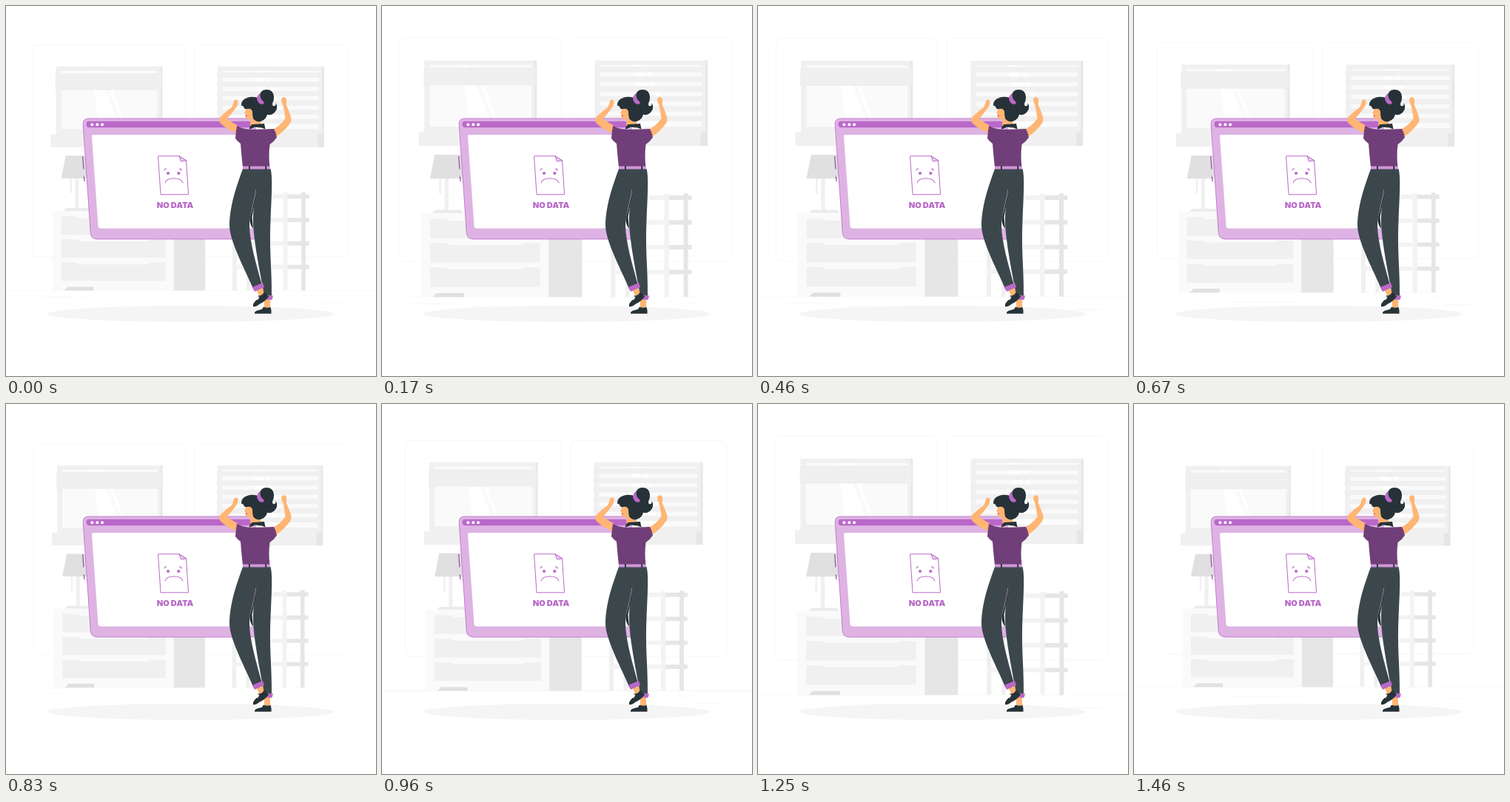
Write an HTML page that moves like this. It is 500x500 px and loops after 1.5 s.

```html
<!DOCTYPE html>
<html lang="en">
<head>
<meta charset="utf-8">
<title>No data</title>
<style>
  html, body { margin: 0; width: 100%; height: 100%; overflow: hidden; background: #fff; }
  svg { display: block; width: 100%; height: 100%; }
  text { font: 900 11px Inter, sans-serif; fill: #ba68c8; text-anchor: middle; }
</style>
</head>
<body>
<svg viewBox="0 0 500 500">
  <g id="room">
    <g fill="none" stroke="#f0f0f0" stroke-width=".5">
      <rect x="38.3" y="55.1" width="204.3" height="282.6" rx="5.6"/>
      <rect x="254.6" y="55.1" width="204.3" height="282.6" rx="5.6"/>
    </g>
    <path fill="#ebebeb" d="M0 382.4h500v.3H0zM416.8 398.5h33.1v.3h-33.1zM322.5 401.2h8.7v.3h-8.7zM396.6 389.2h19.2v.3h-19.2zM52.5 390.9h43.2v.3H52.5zM104.6 390.9h6.3v.3h-6.3zM131.5 395.1h93.7v.3h-93.7z"/>

    <g id="leftWindow">
      <path fill="#f0f0f0" d="M70 83.7h140v91H70zM63 174h153v17.5H63z"/>
      <path fill="#e6e6e6" d="M209.3 83.7h2.5v91h-2.5z"/>
      <path fill="#fafafa" d="M76.8 89.5h128.5v77.7H76.8z"/>
      <path fill="#fff" d="M117 89.5h9l30 77.7h-28zM131 89.5h4l30 77.7h-4z"/>
      <path fill="#f0f0f0" d="M69.2 92.5h141.3v22.8H69.2z"/>
    </g>
    <g id="rightWindow">
      <path fill="#f0f0f0" d="M285.5 83.7h140v91h-140zM273 174h147v17.5H273z"/>
      <path fill="#e6e6e6" d="M425 83.7h2.5v91H425zM419 174h8.5v17.5H419z"/>
      <path fill="#fafafa" d="M292 89.5h128.5v77.7H292z"/>
      <path fill="#fff" d="M333 89.5h9l30 77.7h-28zM347 89.5h4l30 77.7h-4z"/>
    </g>

    <g id="lamp">
      <path fill="#f0f0f0" d="M88.7 232h2.3v20.5h-2.3zM95.5 232h5v41h-5z"/>
      <path fill="#e0e0e0" d="M83 202.7h34l7 30.3H77z"/>
      <path fill="#ebebeb" d="M80.5 276.5q1-4 5-4h28q4 0 5 4z"/>
    </g>
    <g id="dresser">
      <path fill="#fafafa" d="M65.5 276.3h162v106.1h-162z"/>
      <path fill="#e6e6e6" d="M227 276.3h42v106.1h-42z"/>
      <path fill="#e0e0e0" d="M80.5 382.4l5-5h34.5v5z"/>
    </g>
    <g id="rack">
      <path fill="#f0f0f0" d="M305.3 252h5.7v130.4h-5.7zM324 252h5v130.4h-5z"/>
      <path id="backRungs" fill="#f3f3f3"/>
      <path id="frontRungs" fill="#e6e6e6"/>
      <path fill="#f3f3f3" d="M372.8 252h6v130.4h-6z"/>
      <path fill="#e6e6e6" d="M397.2 251.4h5.6v131h-5.6z"/>
    </g>
  </g>

  <ellipse cx="249.5" cy="416" rx="193.5" ry="11" fill="#f5f5f5"/>

  <g id="monitor">
    <path fill="#deb3e4" stroke="#ba68c8" stroke-width=".8" d="M112 152H328q8 0 8.500 8L346 307q0 8-8 8H124q-9 0-9.700-8L104.200 160q-.5-8 7.800-8z"/>
    <path fill="#ba68c8" d="M112 155.700H327q5 0 5 4.300t-4 4.300H113q-4.300 0-4.500-4.300t3.500-4.300z"/>
    <path fill="#fff" d="M118.500 174H325q3 0 3.200 3L336 300.500H128q-3.300 0-3.500-3.500L116 177q-.2-3 2.500-3z"/>
    <g fill="#fff"><circle cx="116.300" cy="160.200" r="2"/><circle cx="123.300" cy="160.200" r="2"/><circle cx="130" cy="160.200" r="2"/></g>
    <path fill="none" stroke="#8c4e96" stroke-width="1.200" d="M103.700 203l1.200 17.500M105.300 230.500l.6 6.500"/>
    <g fill="none" stroke="#ba68c8" stroke-linejoin="round">
      <path d="M205.500 202.800H234l9.500 6 3 46H209z"/>
      <path fill="#ead0ee" d="M234 202.800l2.500 7.200 7-1.200z"/>
      <path stroke-width="1.200" d="M213.200 222q2.300-.6 3-3.200M234.700 219q.8 2.500 3.200 3M215 239.500q1-6.500 12-6.500t12 6.500"/>
    </g>
    <g fill="#ba68c8"><circle cx="219" cy="226" r="2.100"/><circle cx="233.300" cy="226" r="2.100"/></g>
    <text x="228.500" y="272.700">NO DATA</text>
  </g>

  <g id="woman">
    <g id="legs">
      <path fill="#ffb573" d="M349 394h8v14h-8zM338 383l8-4 3 9-6 5z"/>
      <path fill="#263238" d="M336 415.800q-.5-3 3-4l6-1.800q2-4.500 4-3 4 1.500 8.500 0 1.500 4 1 8.800z"/>
      <path fill="#fff" d="M342 409l3-4 3 1-2 4z"/>
      <path fill="#ba68c8" d="M351 390.500l10 1-1.500 5.500-8.500-.5z"/>
      <path fill="#3c474c" d="M330 220h27.500c3 11 1.500 35 0 70-2 40 2 65 1.500 101.500l-10-1.500c-6-30-15-76-15-100 0-20 4-40 4-40z"/>
      <path fill="#263238" d="M339 248l-6.500 37 1.500 16q-5-6-4.500-14z"/>
      <path fill="#3c474c" d="M320 220c-7 20-18 48-18 78 1 22 23 62 31.500 83l12-6c-7-25-19-65-16-86 3-19 9-34 11.500-69z"/>
      <path fill="#ba68c8" d="M332.500 380l14.500-6 2 6-13 6z"/>
      <path fill="#263238" d="M334 406q-.8-3 1.500-5.500l4.500-5q0-5 2.500-4 4-.5 6-4.500 4 1.500 6.500 5.500-5 7-12 10-5 4.500-9 3.500z"/>
      <path fill="#fff" d="M337.500 397.500l2-4.500 3-.5-1.500 4z"/>
    </g>
    <g id="arms" fill="#ffb573">
      <path d="M308 129q0-2.500 2-2.500 4 0 3.500 3.500-.2 5-3 7.500-5 8-12 15 6 4 14.500 9l-2 10q-13-5-21-13-4-4.500 0-9 8-8 15.500-13z"/>
      <path d="M372 127q0-3 2-3.500 4-1 5 2.500.6 4-.5 7 4 9 6.500 17 1.500 5-1.500 9-8 11-18 17l-5-9q10-5 17-15-1-8-3-18-2-3-2.500-7z"/>
    </g>
    <g id="head">
      <path fill="#ffb573" d="M326 136q-2 3-2.500 6l-1.500 3 1.700 1q-.7 6 3.300 7l3.500-.5-.5 10 14 2V142z"/>
      <path fill="#e8574f" d="M323.300 148l3-.5-1.500 2.500z"/>
      <path fill="#263238" d="M318 135q-1-8 8-11 8-3 17 1 11 5 11 15 0 13-10 16-7 1-10-4-1-4-1-9-1-5-7-4-4 1-5-3-2-2-3-1z"/>
      <path fill="#263238" d="M343 121q1-8 9-8 9 0 10 9 .5 5-2 10 0 4 3 3 2-1 1.500-4 3 5 .5 10-4 7-11 6l-7-5q5-3 5-9-8-2-9-12z"/>
      <path fill="#ba68c8" d="M343 118q-5 4-3.500 9.500 2 5 7 5.500 2-1 2.500-3-6-4-6-12z"/>
    </g>
    <path fill="#703e78" d="M312 162q7 4 17 5l21-.5 12-.5q3 5 4 11.500-4 6-9.500 9.500-2 15 0 31H320q-2-18-3-32-4-3-7-7 .5-9 2-17z"/>
    <path fill="#263238" d="M328.500 167q1-5 4-7l16.500-1 1.500 7.500-5-2-9-1z"/>
    <path fill="#cf95d9" d="M320 216.500h36.500v4H320z"/>
    <path fill="#263238" d="M328 216h1.800v5H328zM350.300 216h1.800v5h-1.800z"/>
  </g>
</svg>
<script>
const $ = id => document.getElementById(id);
const NS = "http://www.w3.org/2000/svg";
const DURATION = 1500, BEAT_START = 860, CENTER = "250 228.2";

function addPath(parent, fill, d) {
  const path = document.createElementNS(NS, "path");
  path.setAttribute("fill", fill);
  path.setAttribute("d", d);
  parent.append(path);
}

// Left blind is gathered in thin folds, right blind hangs open
for (let i = 0; i < 6; i++) {
  addPath($("leftWindow"), "#ebebeb", `M69.2 ${95.5 + i * 3.6}h141.3v.6H69.2z`);
  addPath($("rightWindow"), "#f0f0f0", `M284.700 ${91.5 + i * 12.4}h136v7h-136z`);
}
for (let i = 0; i < 3; i++) {
  addPath($("dresser"), "#f0f0f0",
    `M77 ${283.6 + i * 30.7}h19q3 0 5 2.500h91q2-2.500 5-2.500h19v24.500H77z`);
}

const rungs = (x, width) =>
  [0, 1, 2, 3].map(i => `M${x} ${254.2 + i * 31.3}h${width}v5.6h${-width}z`).join("");
$("backRungs").setAttribute("d", rungs(306, 70));
$("frontRungs").setAttribute("d", rungs(378, 29.6));

// Two beats: up, down, up, then a slower fall
function beat(p) {
  return p < .6 ? 1 - Math.abs(1 - p / .2 % 2) : (1 - p) / .4;
}

function draw(now) {
  const p = (now - BEAT_START + DURATION) % DURATION / DURATION;
  const scale = 1 + .1 * beat(p);
  $("room").setAttribute("transform",
    `translate(${CENTER}) scale(${scale}) translate(-250 -228.2)`);
  requestAnimationFrame(draw);
}
draw(performance.now());
</script>
</body>
</html>
```
